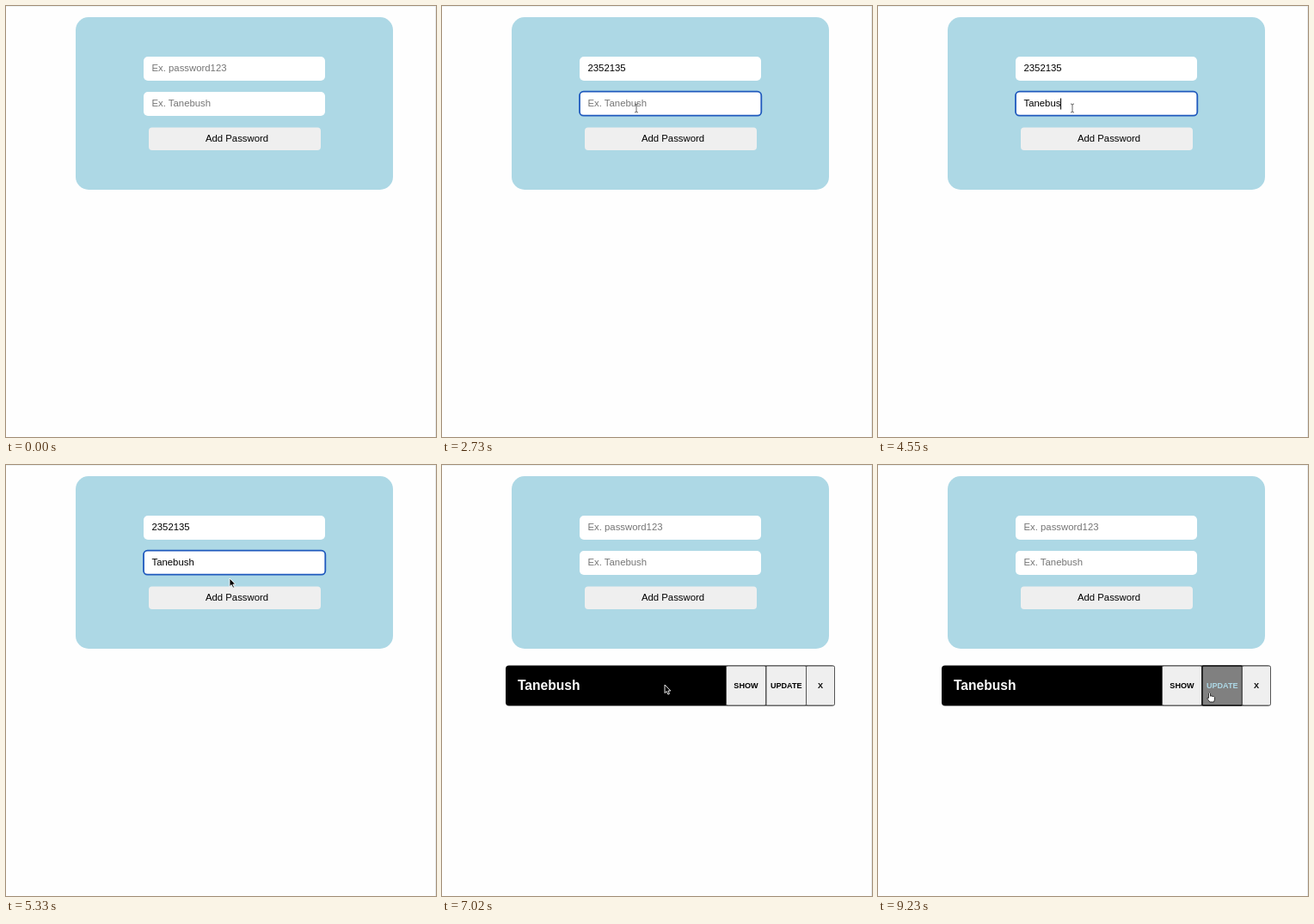
An HTML page that plays this animation: 500 by 502 pixels, repeating every 9360 ms.

```html
<!DOCTYPE html>
<html lang="en">
<head>
<meta charset="utf-8">
<title>Password form</title>
<style>
  html, body { margin: 0; width: 100%; height: 100%; overflow: hidden; background: #fefefe; }
  svg { display: block; width: 500px; height: 502px; }
  text { font: 11.35px "Liberation Sans", Arial, sans-serif; white-space: pre; }
  .hint { fill: #757575; }
  .ring { fill: none; stroke: #1f59bd; stroke-width: 1.8; }
  .title { font-size: 15.6px; font-weight: bold; fill: #fff; }
  .btn rect { fill: #efefef; stroke: #555; }
  .btn text { font-size: 9.1px; font-weight: bold; text-anchor: middle; }
  .btn.hover rect { fill: #808080; stroke: #111; stroke-width: 1.5; }
  .btn.hover text { fill: #add8e6; }
</style>
</head>
<body>
<svg id="stage" viewBox="0 0 500 502">
  <path d="M0 .5H500" stroke="#edf1f3"/>
  <path d="M499.5 0V502" stroke="#e6e8e9"/>
  <rect x="81" y="13" width="369" height="201" rx="15" fill="#add8e5"/>
  <g id="fields"></g>
  <rect x="166" y="141.5" width="200" height="26.5" rx="4" fill="#efefef"/>
  <text x="268.5" y="158.3" text-anchor="middle">Add Password</text>
  <g id="card">
    <rect x="74" y="233.5" width="383" height="47" rx="4"/>
    <text class="title" x="88" y="262.3">Tanebush</text>
  </g>
  <g id="cursor">
    <path id="arrow" d="M0 0V9.6L2.2 7.6L3.9 11.2L5.5 10.4L3.9 7H6.8Z" fill="#000" stroke="#fff" stroke-width=".9"/>
    <path id="beam" d="M-2 -5Q0 -5 0 -3.8Q0 -5 2 -5M0 -4V4M-2 5Q0 5 0 3.8Q0 5 2 5" fill="none" stroke="#555" stroke-width=".9"/>
    <path id="hand" d="M-1 1Q0 -.9 1 1V4.2L2.3 3.9L3.6 4.5L5 4.6L6 5.6V8L5 11H.3L-2.6 7.2Q-3 5.6 -1 6.4Z" fill="#fff" stroke="#111" stroke-width=".8"/>
  </g>
</svg>
<script>
const LOOP = 9360, STEP = 130, BLINK = 520;
const BLUR = 5720, ADDED = 5980;
const $ = id => document.getElementById(id);

function add(parent, tag, attrs, label = "") {
  const el = document.createElementNS("http://www.w3.org/2000/svg", tag);
  for (const k in attrs) el.setAttribute(k, attrs[k]);
  el.textContent = label;
  return parent.appendChild(el);
}

function makeField(y, hint, value, keys, from, to) {
  const g = $("fields");
  add(g, "rect", { x: 160, y, width: 211, height: 28, rx: 5, fill: "#fff" });
  return {
    y, hint, value, keys, from, to,
    ring: add(g, "rect", { class: "ring", x: 160, y: y - .3, width: 211.3, height: 28, rx: 4.5 }),
    text: add(g, "text", { x: 169.5, y: y + 17.4 }),
    caret: add(g, "rect", { y: y + 7.5, width: 1, height: 13 })
  };
}

function makeButton(x, width, label, from, to) {
  const g = add($("card"), "g", { class: "btn" });
  add(g, "rect", { x: x + .5, y: 234, width: width - 1, height: 46, rx: 1.5 });
  add(g, "text", { x: x + width / 2, y: 260.4 }, label);
  return { g, from, to };
}

const fields = [
  makeField(59, "Ex. password123", "2352135",
    [1170, 1300, 1430, 1560, 1690, 1820, 1950], 780, 2210),
  makeField(100, "Ex. Tanebush", "Tanebush",
    [3120, 3250, 3380, 3510, 4160, 4290, 4420, 4680], 2210, BLUR)
];
const buttons = [
  makeButton(330, 47, "SHOW", 7540, 9100),
  makeButton(376.5, 47.5, "UPDATE", 9230, LOOP),
  makeButton(423, 34, "X", LOOP, LOOP)
];

// time, x, y of the pointer
const path = [
  [130, 250, 408], [650, 246, 72], [1950, 246, 72], [2210, 226, 119],
  [5070, 226, 119], [5200, 236, 123], [5330, 260, 132], [5590, 268, 155],
  [6110, 268, 155], [7020, 259, 256], [7150, 259, 256], [7670, 352, 262],
  [8060, 352, 262], [9100, 379, 265], [9230, 385.5, 265]
];

function pointerAt(t) {
  const i = path.findIndex(p => p[0] >= t);
  if (i < 1) return path[0].slice(1);
  const [t0, x0, y0] = path[i - 1], [t1, x1, y1] = path[i];
  const k = (t - t0) / (t1 - t0);
  return [x0 + (x1 - x0) * k, y0 + (y1 - y0) * k];
}

const show = (el, on) => el.setAttribute("visibility", on ? "visible" : "hidden");

function drawField(f, t) {
  const typed = f.keys.filter(k => k <= t);
  const value = t < ADDED ? f.value.slice(0, typed.length) : "";
  const focused = t >= f.from && t < f.to;
  const last = Math.max(f.from, ...typed);
  f.text.textContent = value || f.hint;
  f.text.setAttribute("class", value ? "" : "hint");
  f.caret.setAttribute("x", 169.2 + (value ? f.text.getComputedTextLength() : 0));
  show(f.ring, focused);
  show(f.caret, focused && t - last < BLINK);
}

function drawPointer(t) {
  const [x, y] = pointerAt(t);
  const overField = x > 160 && x < 371 && fields.some(f => y > f.y && y < f.y + 28);
  const shape = overField ? "beam" : x > 330 && y > 234 ? "hand" : "arrow";
  $("cursor").setAttribute("transform", `translate(${x} ${y})`);
  for (const id of ["arrow", "beam", "hand"]) show($(id), t >= STEP && id === shape);
}

function draw(t) {
  fields.forEach(f => drawField(f, t));
  buttons.forEach(b => b.g.classList.toggle("hover", t >= b.from && t < b.to));
  show($("card"), t >= ADDED);
  drawPointer(t);
}

const start = performance.now();
function tick() {
  const t = Math.max(0, performance.now() - start) % LOOP;
  draw(Math.floor(t / STEP) * STEP);
  requestAnimationFrame(tick);
}
tick();
</script>
</body>
</html>
```
